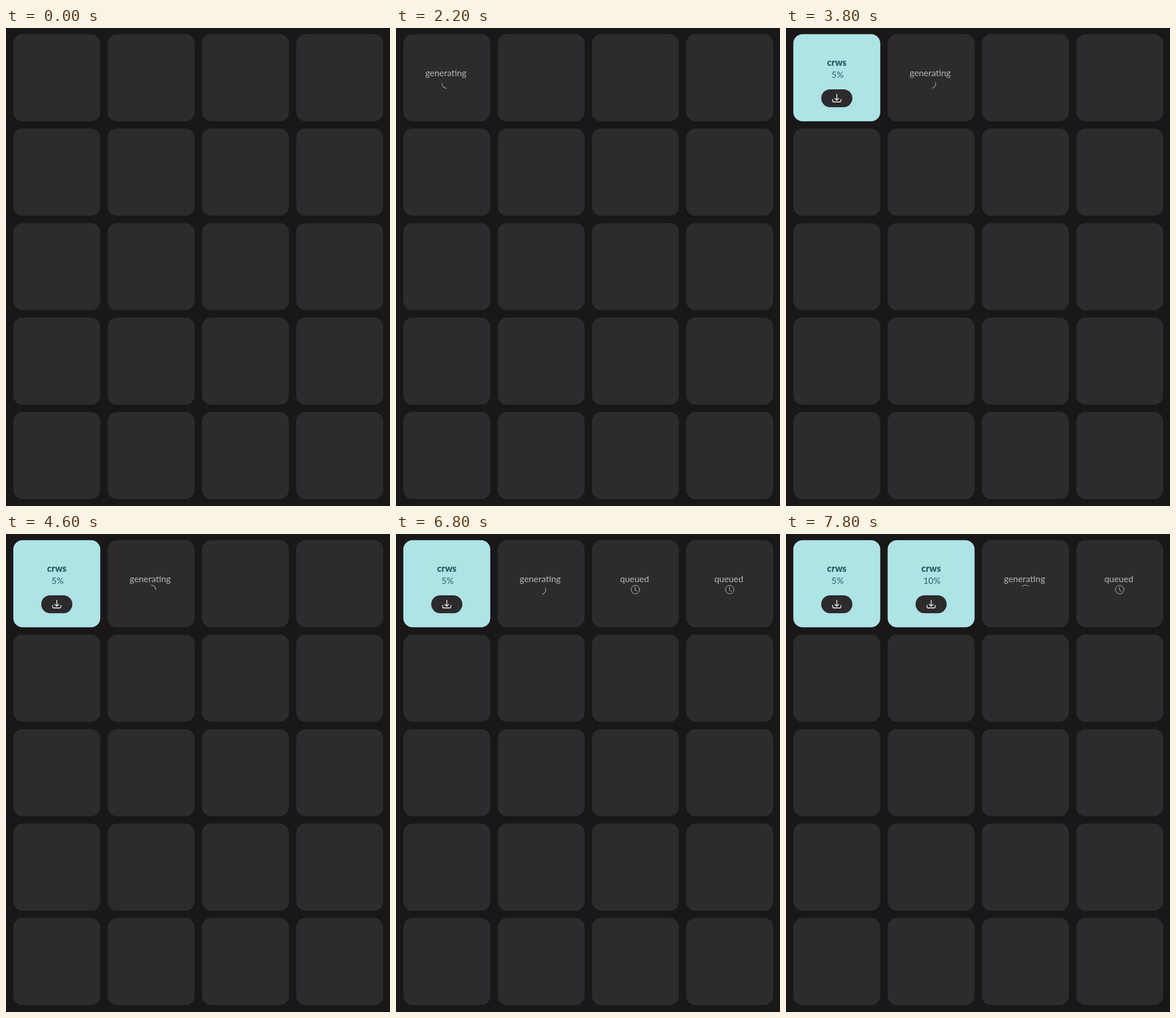
Recreate the animation shown at these times as an HTML page. Size 671 by 834 pixels, loop 8000 ms.

```html
<!DOCTYPE html>
<html lang="en">
<head>
<meta charset="utf-8">
<title>Generation grid</title>
<style>
  html, body { margin: 0; width: 100%; height: 100%; overflow: hidden; background: #1a1718; }
  svg { display: block; width: 100%; height: 100%; }
  text { font: 15.4px Lato, "Open Sans", sans-serif; text-anchor: middle; fill: #b8b7b8; }
  .done text { fill: #2c5d63; }
  .done .name { font-size: 16px; font-weight: 900; }
  .icon { fill: none; stroke: #b8b7b8; stroke-linecap: round; stroke-linejoin: round; }
  .done .icon { stroke: #fff; stroke-width: 1.3; }
</style>
</head>
<body>
<svg id="stage" viewBox="0 0 671 834"></svg>
<script>
const LOOP = 8000, TICK = 200;
const PITCH = 164.8, SIZE = 151.9, MID = SIZE / 2;

// Times in ms; angle is the spinner's heading in degrees when generating starts.
const jobs = [
  { queued: 800, start: 800, done: 3800, angle: -6 },
  { queued: 2600, start: 3800, done: 7000, angle: 27 },
  { queued: 4800, start: 7000, done: Infinity, angle: -18 },
  { queued: 6200, start: Infinity, done: Infinity, angle: 0 }
];

const label = (text, x, y, cls = "") => `<text class="${cls}" x="${x}" y="${y}">${text}</text>`;
const tile = fill => `<rect width="${SIZE}" height="${SIZE}" rx="16" fill="${fill}"/>`;
const empty = tile("#2d2b2d");

const queued = empty + label("queued", MID - 1.6, 72.8) +
  `<g class="icon" transform="translate(${MID - 8} 78.2)">
    <circle cx="8" cy="8" r="7.4"/><path d="M7.6 3.5V9l3.5 2"/>
  </g>`;

// A quarter arc centred on the given heading, turning once per second.
const generating = angle => empty + label("generating", MID - 1.6, 72.8) +
  `<path class="icon" d="M5.8-5.8A8.2 8.2 0 0 1 5.8 5.8"
    transform="translate(${MID} 86.3) rotate(${angle})"/>`;

const done = percent => `<g class="done">${tile("#aee4e6")}
  ${label("crws", MID, 55.5, "name")}${label(percent + "%", MID + 1.5, 76.2)}
  <rect x="${MID - 27.2}" y="96.2" width="54.4" height="31.2" rx="15.6" fill="#2c2a2c"/>
  <path class="icon" transform="translate(${MID - 8} 103.7)"
    d="M.8 9.8v2.9a1.8 1.8 0 0 0 1.8 1.8h10.8a1.8 1.8 0 0 0 1.8-1.8V9.8M8 1v10.5M4.6 8.2L8 11.6l3.4-3.4"/>
  </g>`;

function content(i, t) {
  const job = jobs[i];
  if (!job || t < job.queued) return empty;
  if (t < job.start) return queued;
  if (t < job.done) return generating(job.angle + (t - job.start) * 0.36);
  return done((i + 1) * 5);
}

const stage = document.getElementById("stage");
const cells = Array.from({ length: 20 }, (_, i) => {
  const g = document.createElementNS("http://www.w3.org/2000/svg", "g");
  const x = 12.8 + (i % 4) * PITCH, y = 10.8 + Math.floor(i / 4) * PITCH;
  g.setAttribute("transform", `translate(${x} ${y})`);
  return stage.appendChild(g);
});

let origin = null, shown = -1;
function frame(now) {
  origin ??= now;
  const t = Math.floor((now - origin) % LOOP / TICK) * TICK;
  if (t !== shown) {
    cells.forEach((g, i) => { g.innerHTML = content(i, t); });
    shown = t;
  }
  requestAnimationFrame(frame);
}
requestAnimationFrame(frame);
</script>
</body>
</html>
```
